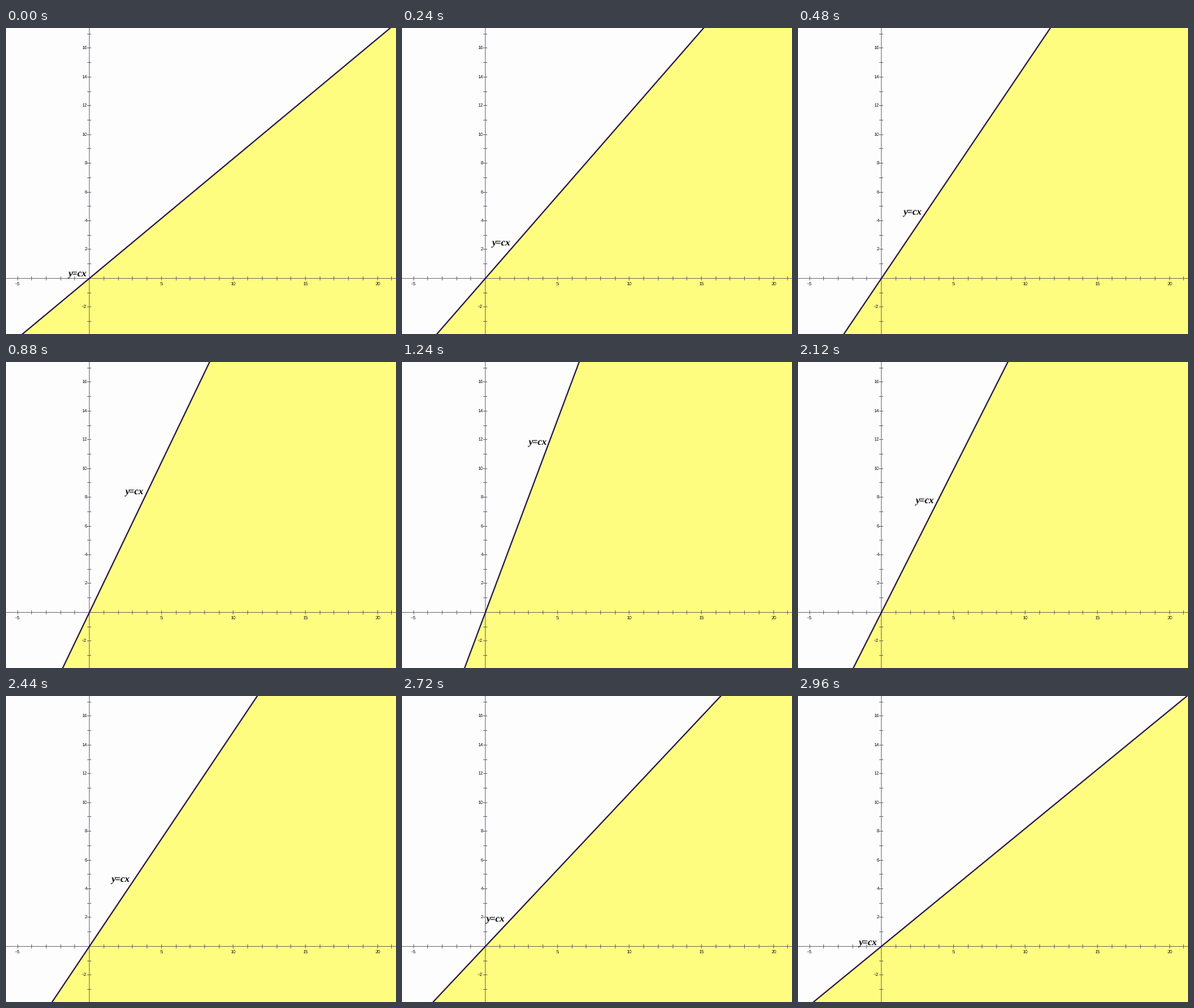
Recreate the animation shown at these times as a matplotlib script. Size 480x377 px, loop 3 s.

```python
import numpy as np
import matplotlib.pyplot as plt
from matplotlib.animation import FuncAnimation

plt.rcParams["text.hinting"] = "none"

W, H, DPI = 480, 377, 64
FRAMES, STEP = 75, 40
X0, Y0, UNIT = 102.7, 308.4, 17.72  # origin and unit length in pixels
PX = 72 / DPI

fig = plt.figure(figsize=(W / DPI, H / DPI), dpi=DPI, facecolor="#fefdfe")
ax = fig.add_axes([0, 0, 1, 1])
ax.set_xlim(0, W)
ax.set_ylim(H, 0)
ax.axis("off")


def slope(t):
    """Speeds up while rising, falls steadily, rests at the bottom."""
    rise = .833 + 1.274 * t + .17 * t ** 2
    fall = .82 + 1.53 * max(0, 2.88 - t)
    return min(rise, fall)


def label_pos(c):
    u = 1 / c
    return 195 - 69.2 * u - 17 * u ** 2, 408 - 130.2 * c + 5.6 * c ** 2


def stroke(xs, ys):
    ax.plot(xs, ys, color="#4c4858", alpha=.6, lw=PX, zorder=2,
            solid_capstyle="butt", snap=False)


def number(x, y, value, align):
    ax.text(x, y, str(value).replace("-", "\u2212"), ha=align, va="center",
            family="Liberation Sans", size=5.9 * PX, color="#1c1a20", zorder=3)


def draw_axes():
    stroke([0, W], [308.5, 308.5])
    stroke([102.5, 102.5], [0, H])
    for i in range(-5, 22):
        x = np.floor(X0 + i * UNIT) + .5
        if i and x < W:
            stroke([x, x], [306, 311])
            if i % 5 == 0:
                number(x, 315, i, "center")
    for i in range(-3, 18):
        y = np.floor(Y0 - i * UNIT) + .5
        if i:
            stroke([100, 105], [y, y])
            if i % 2 == 0:
                number(99.8, y, i, "right")


draw_axes()
area, = ax.fill([0, 1, 1], [0, 0, 1], color="#fffd80", lw=0, zorder=1)
line, = ax.plot([], [], color="#180838", lw=1.5 * PX, zorder=4)
label = ax.text(0, 0, "y=cx", family="Liberation Serif", weight="bold",
                style="italic", size=11.7 * PX, color="black",
                ha="center", va="center", zorder=5)


def update(i):
    c = slope(i * STEP / 1000)
    top, bottom, right = -20, H + 20, W + 100
    xt, xb = X0 + (Y0 - top) / c, X0 + (Y0 - bottom) / c
    area.set_xy([(xt, top), (right, top), (right, bottom), (xb, bottom)])
    line.set_data([xb, xt], [bottom, top])
    label.set_position(label_pos(c))
    return area, line, label


anim = FuncAnimation(fig, update, frames=FRAMES, interval=STEP,
                     repeat=True, repeat_delay=0)
plt.show()
```
